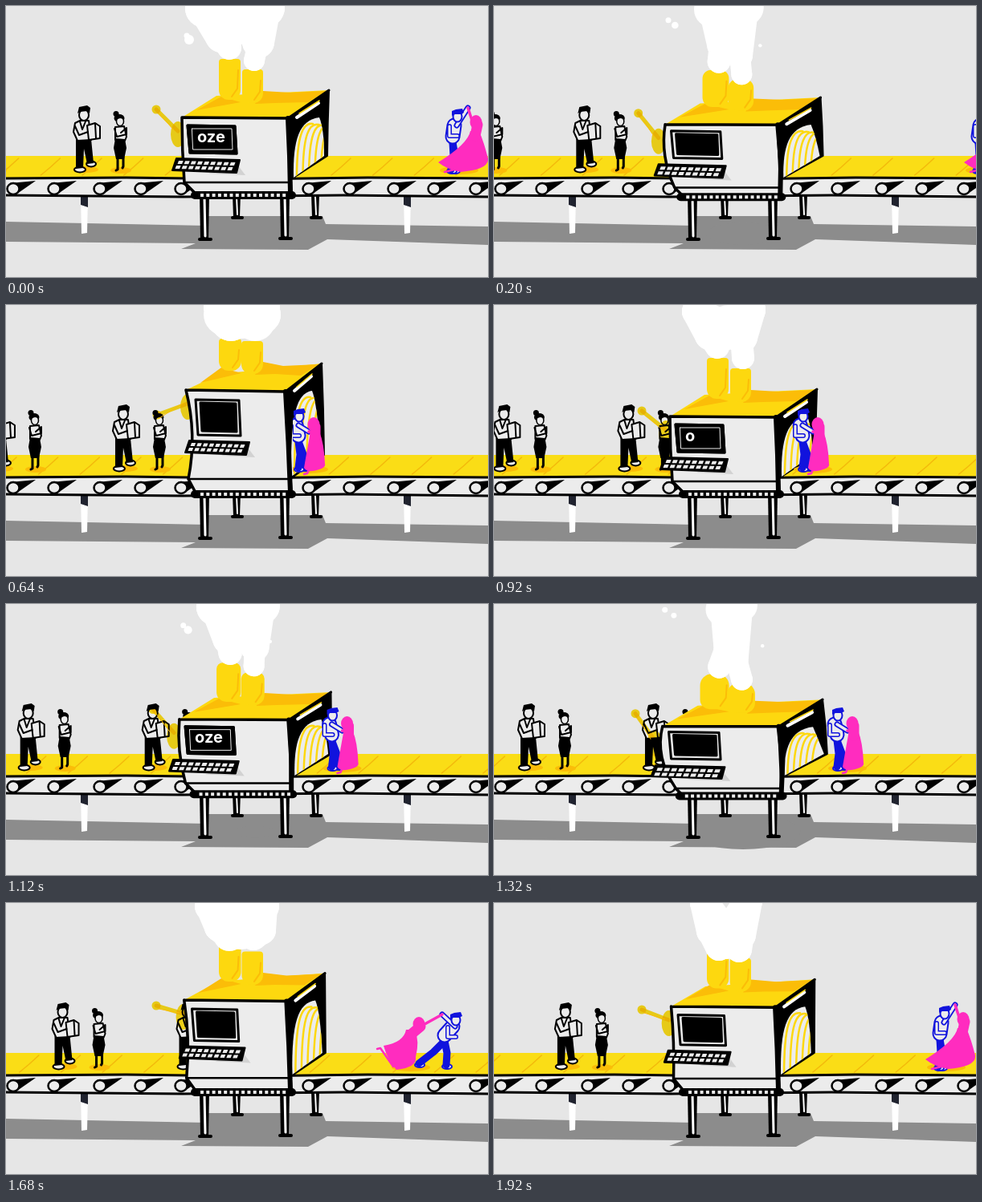
An HTML page with a canvas that plays this animation: 600x338 px, repeating every 1960 ms.

```html
<!DOCTYPE html>
<html lang="en">
<head>
<meta charset="utf-8">
<title>Dance machine</title>
<style>
html, body { margin: 0; width: 100%; height: 100%; overflow: hidden; background: #e6e6e6; }
canvas { display: block; }
</style>
</head>
<body>
<canvas width="600" height="338"></canvas>
<script>
const c = document.querySelector('canvas').getContext('2d');
const LOOP = 1960, STEP = 40, PULSE = 1013, SPEED = 0.0765, GAP = 155;
const BLACK = '#000', WHITE = '#fff', PAPER = '#ececec', GREY = '#8c8c8c';
const BELT = '#fadd16', YELLOW = '#fdd80f', AMBER = '#fbbd08', BLUE = '#1113dd', PINK = '#ff2cbf';

// Linear interpolation in a list of [time, values]
function at(t, keys) {
  let i = 1;
  while (i < keys.length - 1 && keys[i][0] < t) i++;
  const [t0, a] = keys[i - 1], [t1, b] = keys[i];
  const f = Math.min(1, Math.max(0, (t - t0) / (t1 - t0)));
  return a.map((v, j) => v + (b[j] - v) * f);
}

function paint(fill, line, width = 2) {
  if (fill) { c.fillStyle = fill; c.fill(); }
  if (line) { c.strokeStyle = line; c.lineWidth = width; c.stroke(); }
}
function trace(p) {
  c.beginPath();
  for (let i = 0; i < p.length; i += 2) c.lineTo(p[i], p[i + 1]);
}
function poly(p, fill, line, width) { trace(p); c.closePath(); paint(fill, line, width); }
function path(p, line, width) { trace(p); paint(null, line, width); }
function oval(x, y, rx, ry, fill, line, width) {
  c.beginPath();
  c.ellipse(x, y, Math.max(0, rx), Math.max(0, ry), 0, 0, 7);
  paint(fill, line, width);
}
function limb(p, line, outer, fill, inner) {
  path(p, line, outer);
  if (fill) path(p, fill, inner);
}

// Machine poses: front corners, roof, side, screen, keyboard, left bulge, chimneys
const TALL = [224,106, 348,108, 355,234, 227,217, 266,86, 393,73, 396,187, 236,118, 291,163, 226,169, 303,187, 238, 265,293,42,82, 293,320,45,86];
const REST = [219,139, 351,140, 355,234, 222,220, 262,112, 402,105, 400,187, 226,149, 286,184, 210,190, 291,208, 219, 265,292,66,117, 294,320,79,121];
const FLAT = [206,158, 356,158, 360,242, 228,234, 250,133, 412,125, 421,187, 214,164, 279,198, 194,206, 286,222, 192, 253,293,96,137, 289,327,106,142];

const heights = [[0,[138]], [300,[151]], [400,[157]], [640,[105]], [667,[120]], [907,[128]], [920,[138]], [PULSE,[138]]];
const handles = [[0,[187,129]], [300,[176,136]], [400,[176,145]], [640,[188,137]], [667,[187,128]], [907,[184,133]], [920,[184,132]], [PULSE,[187,129]]];

// Each plume is a chain of discs from the left chimney to the right one
const plume = [278,52,15, 268,38,20, 247,3,24, 292,20,28, 322,2,25, 314,45,20, 309,68,13];
const smokes = [
  [0, plume],
  [300, [281,78,14, 289,55,15, 284,5,22, 293,28,19, 309,2,21, 302,70,14, 308,94,13]],
  [400, [273,84,17, 285,62,18, 292,28,9, 292,46,10, 292,0,8, 302,75,22, 315,96,19]],
  [640, [272,12,26, 280,20,25, 265,2,19, 294,10,32, 322,2,19, 310,20,25, 318,12,24]],
  [667, [278,40,20, 265,30,18, 254,4,19, 292,28,30, 320,4,20, 318,34,18, 308,42,17]],
  [907, [280,55,17, 270,35,18, 262,0,18, 290,38,32, 316,-2,18, 308,40,18, 305,58,16]],
  [920, [278,52,15, 268,38,18, 252,8,18, 292,28,28, 318,6,20, 308,40,20, 310,66,14]],
  [PULSE, plume]
];

// Dancers: his head, shoulder, hip, feet, hand; her head, waist, hem (3), foot
const HUG = [385,138, 381,150, 384,170, 384,203, 392,202, 397,158, 403,149, 404,164, 391,203, 402,207, 417,198, 395,210];
const REACH = [560,145, 556,154, 546,172, 514,200, 548,202, 543,139, 514,151, 503,164, 470,178, 486,208, 510,192, 466,181];
const TWIRL = [561,137, 557,149, 555,170, 553,204, 557,204, 574,127, 584,145, 582,162, 537,195, 565,207, 599,190, 549,206];
const shift = (pose, dx) => pose.map((v, i) => i % 2 ? v : v + dx);
const dance = [
  [300, shift(HUG, -46)], [400, shift(HUG, -33)], [640, shift(HUG, -20)], [920, HUG],
  [1320, shift(HUG, 43)], [1680, REACH], [1920, TWIRL], [1960, shift(TWIRL, 1)], [2360, shift(TWIRL, 95)]
];

function floor(squash) {
  c.fillStyle = '#e6e6e6';
  c.fillRect(0, 0, 600, 338);
  poly([0,269, 250,274, 250,262, 394,262, 398,272, 600,275, 600,298, 400,291, 376,304, 218,303, 236,296, 0,294], GREY);
  oval(310, 284, 101 * squash, 31 * squash, GREY);
  for (const x of [97, 499]) {
    poly([x - 4,236, x + 5,236, x + 4,283, x - 3,284], WHITE);
    poly([x - 4,236, x + 5,236, x + 5,251, x - 4,248], '#20232f');
  }
  for (const x of [287, 385]) leg(x, 264, 5);
}

function leg(x, y, w) {
  poly([x - w,234, x + w,234, x + w - 1,y, x - w + 1,y], BLACK);
  path([x,238, x + 1,y - 4], WHITE, w - 3);
  path([x - w,y, x + w + 2,y], BLACK, 4);
}

function conveyor(t) {
  c.fillStyle = BELT;
  c.fillRect(0, 187, 600, 28);
  for (let x = -60 + (SPEED * t) % (GAP / 3); x < 620; x += GAP / 3)
    path([x,211, x + 12,201, x + 24,190], '#f3b90c', 1.5);
  c.fillStyle = PAPER;
  c.fillRect(0, 216, 600, 20);
  for (const x of [9, 60, 117, 168, 218, 377, 428, 483, 533, 585]) {
    poly([x - 4,221, x + 28,218, x + 5,234], BLACK);
    oval(x, 228, 7.5, 7, PAPER, BLACK, 2.5);
  }
  path([0,215, 150,214, 300,216, 450,214, 600,215], BLACK, 3);
  path([0,236, 220,238, 420,236, 600,238], BLACK, 3);
}

function man(x) {
  c.save();
  c.translate(x, 0);
  oval(2, 204, 16, 4, AMBER);
  oval(-5, 204, 7, 3.5, PAPER, BLACK);
  oval(9, 197, 6, 3.5, PAPER, BLACK);
  poly([-10,166, 9,166, 12,196, 4,197, 0,178, -1,202, -10,203], BLACK);
  poly([-5,143, 6,143, 9,167, -8,168, -13,157, -11,146], PAPER, BLACK);
  path([-5,144, -2,154, 2,144], BLACK, 2);
  poly([4,149, 14,146, 20,150, 20,165, 6,167], PAPER, BLACK);
  path([14,147, 15,165], BLACK, 2);
  path([-11,150, -6,161, 5,157], BLACK, 2);
  oval(0, 136, 6, 7, PAPER, BLACK);
  poly([-8,134, -6,126, 4,124, 8,127, 7,134, 4,131, -5,132], BLACK);
  c.restore();
}

function woman(x) {
  c.save();
  c.translate(x, 0);
  oval(1, 205, 13, 4, AMBER);
  path([-3,188, -3,204, -5,205], BLACK, 3);
  path([4,188, 4,200, 3,202], BLACK, 3);
  poly([-6,151, 5,150, 8,163, 6,168, -6,167], PAPER, BLACK);
  poly([-6,165, 6,166, 8,177, 5,191, -5,191, -8,177], BLACK);
  path([-7,153, -4,163, 8,160, 8,152, 1,158], BLACK, 2);
  oval(-5, 134.5, 3.5, 3.5, BLACK);
  oval(-1, 140, 6.5, 5, BLACK);
  oval(0, 144, 4.5, 5.5, PAPER, BLACK, 1.5);
  poly([-6,142, -4,137, 3,136, 5,141, 0,140], BLACK);
  c.restore();
}

function lever(x, y, hx, hy) {
  c.globalCompositeOperation = 'multiply';
  c.beginPath();
  c.ellipse(hx, hy, 9, 16, 0, 0, 7);
  c.ellipse(x, y, 5.5, 5.5, 0, 0, 7);
  paint('#ffe01a');
  path([x,y, hx,hy - 4], '#ffe01a', 5);
  c.globalCompositeOperation = 'source-over';
  path([x + 3,y + 4, hx - 5,hy - 5], AMBER, 1);
}

function smoke(p) {
  const d = at(p, smokes);
  for (let i = 0; i < d.length; i += 3) {
    oval(d[i], d[i + 1], d[i + 2], d[i + 2], WHITE);
    if (i) path([d[i - 3],d[i - 2], d[i],d[i + 1]], WHITE, 2 * Math.min(d[i - 1], d[i + 2]));
  }
  if (p < 350) {
    const f = p / 300, r = 6 - 2.5 * f;
    oval(228 - 4 * f, 42 - 27 * f, r, r, WHITE);
    oval(225 - 12 * f, 37 - 29 * f, 3.5, 3.5, WHITE);
    oval(326 + 8 * f, 44 + 8 * f, 2.2, 2.2, WHITE);
  } else if (p < 520) {
    const dy = (400 - p) / 6;
    oval(305, 15 + dy, 3.5, 5, WHITE);
    oval(306, 27 + dy, 4, 4, WHITE);
  }
}

function chimney(l, r, top, base, squash) {
  const k = 4 + squash * 15;
  c.beginPath();
  c.roundRect(l, top, r - l, base - top, [k, k, 12, 12]);
  paint(YELLOW);
  path([r - 3,top + 14, r - 4,base - 14, r - 11,base - 4], AMBER, 2);
}

function opening(tx, bx, by, ex) {
  c.beginPath();
  c.moveTo(tx + 7, 214);
  c.bezierCurveTo(tx + 6, by + 62, tx + 14, by + 37, bx - 12, by + 34);
  c.quadraticCurveTo(bx - 6, by + 48, ex - 4, 187);
  c.closePath();
}

function keyboard(x, y, X, Y) {
  poly([x + 2,y, X,y + 2, X - 4,Y, x - 3,Y - 3], BLACK, BLACK, 2);
  const w = (X - x - 8) / 9;
  for (let row = 0; row < 2; row++)
    for (let i = 0; i < 9; i++) {
      const kx = x + 5 + i * w - row * 3, ky = y + 3 + row * 6 + i * 0.25;
      poly([kx,ky, kx + w - 2.5,ky, kx + w - 4,ky + 4, kx - 1.5,ky + 4], PAPER);
    }
}

function screen(x, y, X, Y, letters) {
  poly([x,y, X - 1,y + 1, X + 1,Y, x + 3,Y - 1], PAPER, BLACK, 3);
  poly([x + 6,y + 4, X - 5,y + 5, X - 4,Y - 5, x + 8,Y - 6], BLACK, BLACK, 3);
  if (!letters) return;
  poly([x,y, X - 1,y + 1, X + 1,Y, x + 3,Y - 1], BLACK, BLACK, 3);
  poly([x + 5,y + 4, X - 5,y + 4, X - 4,Y - 5, x + 7,Y - 5], BLACK, PAPER, 1);
  c.fillStyle = WHITE;
  c.font = '700 20px Inter, sans-serif';
  c.fillText('oze'.slice(0, letters), x + 12, Y - 14);
}

function machine(m, p, squash) {
  const [lx, ly, tx, ty, rx, ry, dx, dy, ax, ay, bx, by, ex, ey, sx, sy, sX, sY, kx, ky, kX, kY, bulge, ...ch] = m;
  const [hx, hy] = at(p, handles);
  lever(hx, hy, (lx + bulge) / 2 - 5, ly + 21);

  // Side with tunnel
  c.beginPath();
  c.moveTo(tx, ty);
  c.lineTo(bx, by);
  c.quadraticCurveTo(bx + (ex - bx) * 0.8, (by + ey) / 2, ex, ey);
  c.lineTo(rx, 216);
  c.closePath();
  paint(BLACK, BLACK, 2);
  c.save();
  opening(tx, bx, by, ex);
  paint(PAPER);
  c.clip();
  for (let i = 0; i < 5; i++) {
    const x = tx + 11 + i * 7.5;
    c.beginPath();
    c.moveTo(x, 214);
    c.bezierCurveTo(x, by + 55, x + 8, by + 40, x + 20, by + 42 + i);
    paint(null, YELLOW, 2.5);
  }
  c.restore();
  path([tx + 11,ty - 1, bx - 13,by + 16], WHITE, 4);
  path([tx + 14,ty - 6, bx - 12,by + 13], YELLOW, 1.5);

  // Roof and chimneys
  poly([lx,ly, ax,ay, bx,by, tx,ty], YELLOW);
  poly([ch[5] - 10,ch[7] + 1, ch[5],ch[7] - 15, bx - 48,by + 3, bx - 4,by + 1, bx - 26,by + 15, ch[5] + 15,ch[7]], AMBER);
  poly([lx + 18,ly - 9, ch[0] + 3,ch[3] - 4, ch[1],ch[3] + 3], AMBER);
  chimney(...ch.slice(0, 4), squash);
  chimney(...ch.slice(4), squash);
  smoke(p);
  path([tx,ty, bx,by], BLACK, 3);

  // Front
  leg(247, 291, 6);
  leg(347, 290, 6);
  c.beginPath();
  c.moveTo(lx, ly);
  c.lineTo(tx, ty);
  c.lineTo(rx, ry);
  c.lineTo(236, ry);
  c.lineTo(dx, dy);
  c.quadraticCurveTo(bulge, (ly + dy) / 2, lx, ly);
  paint(PAPER, BLACK, 3.5);
  path([tx,ty, (tx + rx) / 2 + squash * 4,(ty + ry) / 2, rx - 1,ry], BLACK, 6);
  path([dx,dy, rx,dy], BLACK, 2.5);
  poly([kX - 5,ky + 5, kX + 7,kY + 3, kx + 42,kY + 1], '#d2d2d2');
  screen(sx, sy, sX, sY, p < 150 || p >= 990 ? 3 : p >= 960 ? 2 : p >= 915 ? 1 : 0);
  keyboard(kx, ky, kX, kY);
  const left = 235 - squash * 6, bar = 236 + squash * 5;
  path([left,bar, rx + 1,bar], BLACK, 10);
  for (let x = left + 7; x < rx - 4; x += 7.3) {
    c.fillStyle = PAPER;
    c.fillRect(x, bar - 2, 4, 4);
  }
}

function couple(t) {
  const [mx, my, sx, sy, hx, hy, ax, ay, bx, by, gx, gy, wx, wy, qx, qy, lx, ly, nx, ny, rx, ry, fx, fy] = at(t, dance);
  oval((ax + nx) / 2 + 4, 205, 24, 5, AMBER);
  for (const [x, y] of [[bx, by], [ax, ay]]) {
    oval(x + 1, y + 2, 6, 3, PAPER, BLUE);
    limb([hx,hy, (hx + x) / 2 + 2,(hy + y) / 2, x,y], BLUE, 9);
  }
  limb([sx,sy, hx,hy - 7], BLUE, 19, PAPER, 15);
  limb([sx - 6,sy + 1, sx - 6,sy + 13, sx + 4,sy + 13], BLUE, 6, PAPER, 3);
  limb([sx + 3,sy, gx,gy], BLUE, 7, PAPER, 3.5);
  oval(mx, my + 1, 5.5, 6.5, PAPER, BLUE);
  poly([mx - 7,my, mx - 7,my - 6, mx - 2,my - 8, mx + 6,my - 9, mx + 8,my - 4, mx + 4,my - 2, mx - 3,my - 2], BLUE);

  path([nx - 4,ny - 4, fx,fy, fx - 4,fy + 1], PINK, 2.5);
  path([qx + 2,qy - 4, gx,gy], PINK, 3.5);
  c.beginPath();
  c.moveTo(qx - 5, qy - 6);
  c.quadraticCurveTo(qx - 8, qy + 10, lx, ly);
  c.quadraticCurveTo((lx + nx) / 2 - 3, (ly + ny) / 2 + 3, nx, ny);
  c.quadraticCurveTo(rx + 2, ny - 3, rx, ry);
  c.quadraticCurveTo(qx + 12, qy + 8, qx + 6, qy - 6);
  c.closePath();
  paint(PINK);
  oval(wx, wy, 7.5, 9, PINK);
  limb([wx + 2,wy + 3, qx + 1,qy], PINK, 13);
}

function draw(t) {
  const p = t % PULSE, [h] = at(p, heights);
  const m = at(h, [[105, TALL], [138, REST], [157, FLAT]]);
  const squash = Math.max(0, (h - 138) / 19);
  c.lineJoin = c.lineCap = 'round';
  floor(squash);
  conveyor(t);
  for (const k of [-1, 0]) {
    const x = 97 + SPEED * t + k * GAP;
    man(x);
    woman(x + 45);
  }
  machine(m, p, squash);
  c.save();
  if (t < 600) opening(m[2], m[10], m[11], m[12]);
  else {
    c.beginPath();
    c.rect(357, 0, 243, 338);
  }
  c.clip();
  if (t >= 300) couple(t);
  c.restore();
  if (t < 400) couple(t + LOOP);
}

let start;
function tick(now) {
  start ??= now;
  draw(Math.floor((now - start) % LOOP / STEP) * STEP);
  requestAnimationFrame(tick);
}
requestAnimationFrame(tick);
</script>
</body>
</html>
```
